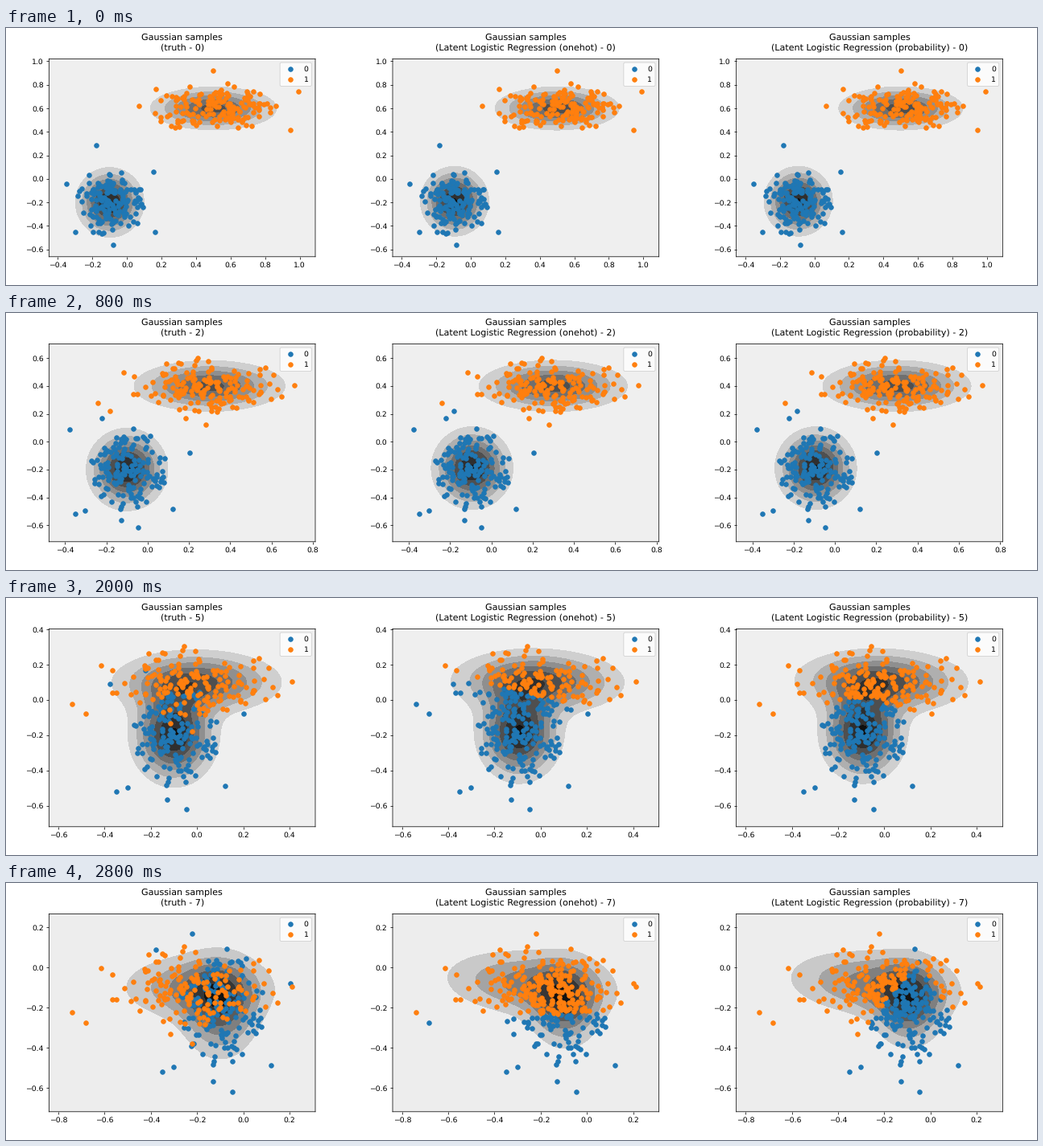
A matplotlib script that plays this animation: 1280 by 320 pixels, repeating every 3.2 s.

```python
import numpy as np
import matplotlib.pyplot as plt
from matplotlib.animation import FuncAnimation

STEPS, STEP_MS = 8, 400
SCALE = 2 / 3
SCALED = [
    "font.size", "axes.linewidth", "lines.linewidth", "lines.markersize",
    "patch.linewidth",
    "xtick.major.size", "xtick.major.width", "xtick.major.pad",
    "ytick.major.size", "ytick.major.width", "ytick.major.pad",
]
for key in SCALED:
    plt.rcParams[key] *= SCALE
plt.rcParams["axes.titlepad"] = 7.6
plt.rcParams["path.snap"] = False
plt.rcParams["text.hinting"] = "none"

SAMPLES = 150
MEAN0, SD0 = np.array([-0.1, -0.2]), np.array([0.1, 0.15])
SD1 = np.array([0.2, 0.1])
PANELS = [
    ("truth", "truth"),
    ("onehot", "Latent Logistic Regression (onehot)"),
    ("probability", "Latent Logistic Regression (probability)"),
]


def core(rng, count, limit=2.0):
    z = rng.normal(size=(3 * count, 2))
    return z[np.hypot(z[:, 0], z[:, 1]) < limit][:count]


def cloud(seed, far0, far1):
    """Both classes with their extreme samples; class 1 is centred on zero."""
    rng = np.random.default_rng(seed)
    class0 = MEAN0 + SD0 * core(rng, SAMPLES)
    class1 = SD1 * core(rng, SAMPLES)
    return np.vstack([class0, far0]), np.vstack([class1, far1])


FIRST = cloud(
    3,
    [(-.352, -.041), (-.18, .283), (.161, -.449), (-.082, -.562),
     (-.3, -.455), (.151, .058)],
    [(0, .321), (.49, .143), (-.433, .023), (.444, -.186), (.08, .215),
     (-.335, .167)],
)
LATER = cloud(
    8,
    [(-.378, .09), (-.222, .167), (-.35, -.518), (-.302, -.495),
     (-.13, -.567), (-.047, -.619), (.12, -.486), (.203, -.078)],
    [(-.541, -.122), (-.483, -.177), (-.415, .095), (-.117, -.232),
     (-.02, -.279), (-.057, .203), (.412, .005), (.311, .083)],
)


def gauss(x, y, mean, sd, tilt=0):
    u = (x - mean[0]) / sd[0]
    v = (y - mean[1] - tilt * (x - mean[0])) / sd[1]
    return np.exp(-(u * u + v * v) / 2) / (2 * np.pi * sd[0] * sd[1])


def true_parts(x, y, mean1):
    return gauss(x, y, MEAN0, SD0), gauss(x, y, mean1, SD1)


def fitted_parts(x, y, mean1, step):
    """The fit drifts from the truth once the two classes overlap."""
    t = max(0, (step - 3) / 4) ** 2
    part0 = gauss(x, y, (-.093, -.19 + .01 * t), (.1 - .008 * t, .15 - .02 * t))
    centre1 = mean1 + t * np.array([-.05, .02])
    part1 = gauss(x, y, centre1, (.195 + .03 * t, .1), -.08 * t)
    return (1 - .2 * t) * part0, (1 + .2 * t) * part1


def is_upper(kind, x, y, mean1, step):
    if kind == "onehot":
        level = np.interp(step, [0, 5, 6, 7], [.32, .02, -.02, -.23])
        slope = np.interp(step, [5, 7], [-.3, 0])
        return y > level + slope * x
    part0, part1 = fitted_parts(x, y, mean1, step)
    return part1 > part0


def draw_panel(ax, kind, name, step):
    mean1 = np.array([0.5, 0.6]) - 0.1 * step
    pts0, rel1 = FIRST if step == 0 else LATER
    pts1 = rel1 + mean1
    pts = np.vstack([pts0, pts1])
    lo, hi = pts.min(axis=0) - 0.1, pts.max(axis=0) + 0.1
    x, y = np.meshgrid(np.linspace(lo[0], hi[0], 100),
                       np.linspace(lo[1], hi[1], 100))

    if kind == "truth":
        density = sum(true_parts(x, y, mean1))
    else:
        density = sum(fitted_parts(x, y, mean1, step))
        upper = is_upper(kind, *pts.T, mean1, step)
        pts0, pts1 = pts[~upper], pts[upper]

    ax.clear()
    ax.contourf(x, y, density, cmap="gray_r")
    for label, group in enumerate((pts0, pts1)):
        ax.scatter(group[:, 0], group[:, 1], label=str(label))
    ax.set_xlim(lo[0], hi[0])
    ax.set_ylim(lo[1], hi[1])
    ax.set_title(f"Gaussian samples\n({name} - {step})", linespacing=1.26)
    ax.legend(loc="upper right")


def update(step):
    for ax, (kind, name) in zip(axes, PANELS):
        draw_panel(ax, kind, name, step)
    return axes


fig = plt.figure(figsize=(12.8, 3.2), dpi=100)
axes = [fig.add_axes([(i + 0.125) / 3, 0.11, 0.775 / 3, 0.77])
        for i in range(3)]
anim = FuncAnimation(fig, update, frames=STEPS, interval=STEP_MS, repeat=True)
plt.show()
```
